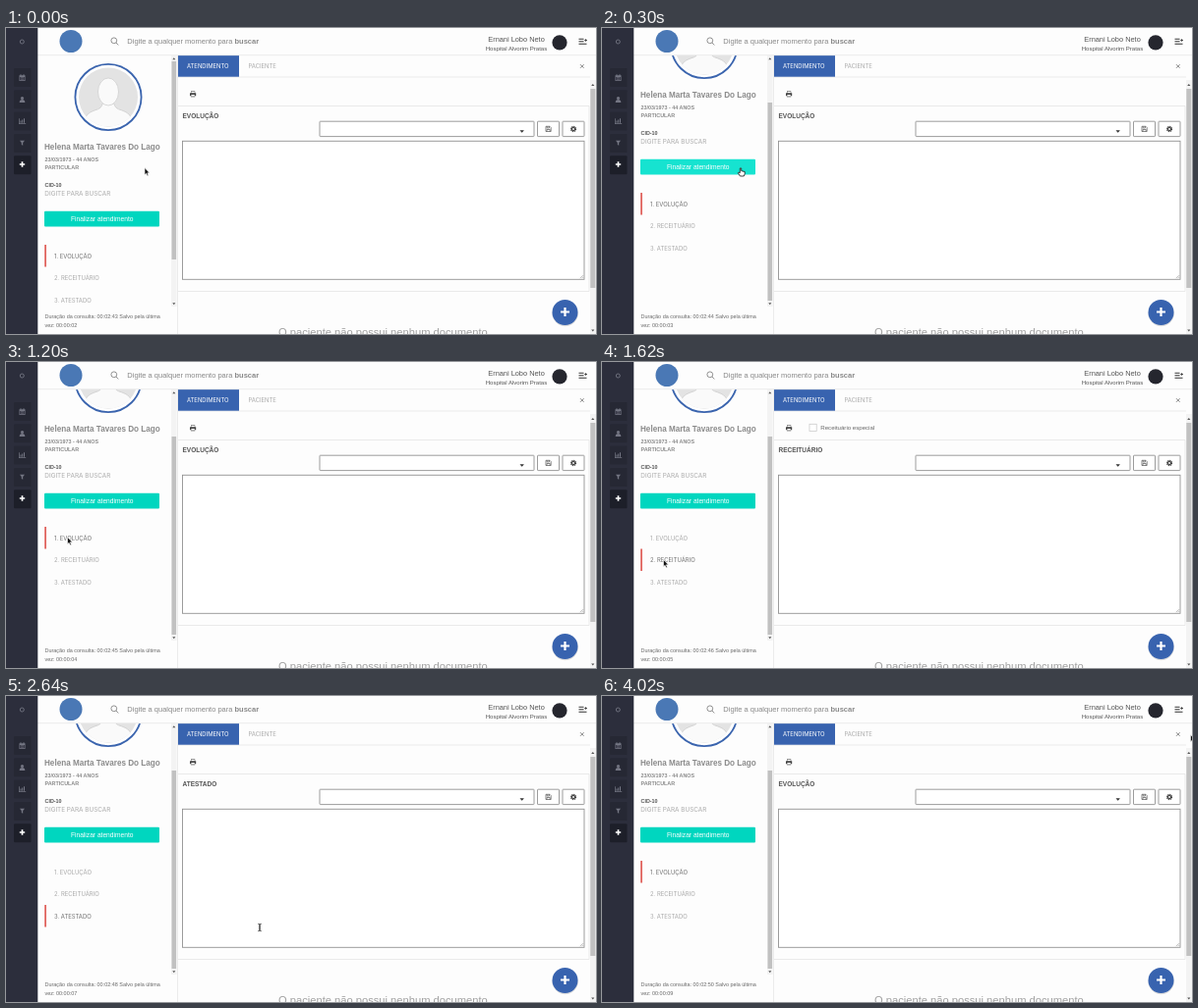
Animation, 600 px wide and 312 px high, one loop 4.08 s. Source, as an HTML page:

```html
<!DOCTYPE html>
<html lang="pt-BR">
<head>
<meta charset="utf-8">
<title>Atendimento</title>
<style>
  html, body { margin: 0; width: 100%; height: 100%; overflow: hidden; background: #fdfdfd; }
  svg { display: block; width: 600px; height: 312px; font-family: "Liberation Sans", Arial, sans-serif; }
  .wide { font-family: Inter, sans-serif; }
  .bold { font-weight: bold; }
  .mid { text-anchor: middle; }
  .line { fill: none; stroke: #e6e6e6; stroke-width: .8; }
  .box { fill: #fff; stroke: #929292; stroke-width: .9; }
  .cursor { stroke-linejoin: round; }
</style>
</head>
<body>
<svg viewBox="0 0 600 312">
  <defs>
    <clipPath id="view"><rect x="33" y="28" width="135" height="256"/></clipPath>
    <clipPath id="face"><circle cx="104" cy="70.5" r="30"/></clipPath>
  </defs>
  <rect width="600" height="312" fill="#fdfdfd"/>

  <!-- patient panel -->
  <g clip-path="url(#view)"><g id="panel">
    <circle cx="104" cy="70.5" r="33.6" fill="#fff" stroke="#3a64ae" stroke-width="1.8"/>
    <circle cx="104" cy="70.5" r="30" fill="#e3e3e3"/>
    <g clip-path="url(#face)" fill="#fafafa" stroke="#cfcfcf" stroke-width=".8">
      <path d="M80 101V94Q81 87 90 84Q98 82 98 77H110Q110 82 118 84Q127 87 128 94V101Z"/>
      <ellipse cx="104" cy="65" rx="10.5" ry="14"/>
    </g>
    <text class="bold" x="39" y="124" font-size="8.15" fill="#8b8b8b">Helena Marta Tavares Do Lago</text>
    <g class="bold" font-size="5.4" fill="#8a8a8a">
      <text x="39.5" y="136">23/03/1973 - 44 ANOS</text>
      <text x="39.5" y="144.3">PARTICULAR</text>
      <text x="39.5" y="162.3" fill="#555">CID-10</text>
    </g>
    <text class="wide" x="39.3" y="171.4" font-size="6.4" fill="#ababab">DIGITE PARA BUSCAR</text>
    <rect id="finish" x="39" y="186.7" width="117" height="15.8" rx="1"/>
    <text class="mid" x="97.7" y="197" font-size="6.65" fill="#fff">Finalizar atendimento</text>
    <g id="items" class="wide" font-size="5.9"></g>
  </g></g>
  <g font-size="5.46" fill="#666">
    <text id="length" x="39.5" y="296"></text>
    <text id="saved" x="39.5" y="305"></text>
  </g>
  <rect x="168" y="28" width="5.5" height="256" fill="#f3f3f3"/>
  <rect id="thumb" x="168.5" width="4.6" height="202" fill="#c1c1c1"/>
  <path d="M169.3 32.2l1.5-2 1.5 2zM169.3 280.2l1.5 2 1.5-2z" fill="#555"/>

  <!-- main area -->
  <path class="line" d="M174.5 28V312M175 50H594M175 79.5H593V268.5H175"/>
  <rect x="175" y="28" width="62" height="21.7" fill="#3863af"/>
  <g class="wide" font-size="5.9">
    <text x="184" y="41.2" fill="#fff">ATENDIMENTO</text>
    <text x="246.5" y="41.2" fill="#aaa">PACIENTE</text>
  </g>
  <path d="M584 37.2l3.6 3.6M587.6 37.2l-3.6 3.6" stroke="#777" stroke-width=".9"/>
  <g fill="#444">
    <path d="M188 64.3h4.2v2h-4.2zM187 66.2h6.2v3h-6.2z"/>
    <path d="M188.4 64.8h3.4v1.4h-3.4zM188.4 68h3.4v1.9h-3.4z" fill="#fff"/>
    <path d="M188 69.6h4.2v.7h-4.2z"/>
  </g>
  <g id="special">
    <rect x="211" y="63.3" width="7.2" height="7.2" fill="#fff" stroke="#ccc" stroke-width=".8"/>
    <text x="222.3" y="69.2" font-size="6.1" fill="#666">Receituário especial</text>
  </g>
  <text id="heading" class="bold" x="179.5" y="92" font-size="6.5" fill="#555"></text>
  <rect class="box" x="319" y="95.2" width="218" height="15.4" rx=".6"/>
  <rect class="box" x="540.5" y="95.2" width="22" height="15.4" rx=".6"/>
  <rect class="box" x="566" y="95.2" width="22" height="15.4" rx=".6"/>
  <path d="M522.5 104.2h4.4l-2.2 2.5z" fill="#333"/>
  <path d="M549 100.3h4l1.2 1.2v4h-5.2zM550.2 100.3v1.7h2.2v-1.7M550 105.5v-2h3.2v2" fill="none" stroke="#555" stroke-width=".7"/>
  <circle cx="577" cy="103" r="2.6" fill="none" stroke="#444" stroke-width="1.1" stroke-dasharray="1.2 .84"/>
  <circle cx="577" cy="103" r="1.6" fill="none" stroke="#444" stroke-width="1.3"/>
  <rect class="box" x="179.5" y="115.3" width="408.5" height="141"/>
  <path d="M584 255.2l3-3M586 255.2l1-1" stroke="#888" stroke-width=".6"/>
  <text x="277" y="314" font-size="11.17" fill="#a0a0a0">O paciente não possui nenhum documento</text>
  <rect x="594" y="53" width="6" height="259" fill="#f3f3f3"/>
  <rect x="594.3" y="62" width="5" height="203" fill="#c1c1c1"/>
  <path d="M595.2 59l1.6-2 1.6 2zM595.2 307.5l1.6 2 1.6-2z" fill="#555"/>
  <circle cx="568.7" cy="291" r="13.2" fill="#000" opacity=".12"/>
  <circle cx="568.5" cy="290" r="13" fill="#3863af"/>
  <path d="M564 289.5h9M568.5 285v9" stroke="#fff" stroke-width="2.2"/>

  <!-- header -->
  <rect x="32" width="568" height="27.5" fill="#fdfdfd"/>
  <path class="line" d="M32 27.7H600"/>
  <circle cx="66" cy="13.5" r="11.5" fill="#4a78b5"/>
  <g fill="none" stroke="#777" stroke-width=".8"><circle cx="109.8" cy="12.8" r="2.9"/><path d="M112 15l2.3 2.4"/></g>
  <text x="123.3" y="16.3" font-size="7.5" fill="#888">Digite a qualquer momento para <tspan class="bold">buscar</tspan></text>
  <g class="mid" fill="#555">
    <text x="519" y="14.3" font-size="7.4">Ernani Lobo Neto</text>
    <text x="519" y="22.8" font-size="6.06">Hospital Alvorim Pratas</text>
  </g>
  <circle cx="563" cy="14.8" r="7.6" fill="#25262e"/>
  <path d="M582.5 11.3h5M582.5 13.8h5M582.5 16.3h8" stroke="#333" stroke-width="1.1"/>
  <path d="M588.2 12.5h2.8M589.6 11.1v2.8" stroke="#333" stroke-width=".8"/>

  <!-- navigation rail -->
  <rect width="32.3" height="312" fill="#2c2e3c"/>
  <g id="rail"></g>
  <circle cx="16.3" cy="14" r="2" fill="none" stroke="#747683" stroke-width=".9"/>
  <g fill="#747683">
    <path d="M13.5 48.3h6v5.6h-6zM14.5 47.3h1v1.5h-1zM17.5 47.3h1v1.5h-1z"/>
    <path d="M14.2 50h4.6v3.2h-4.6z" fill="#2c2e3c"/>
    <path d="M15 50.7h3M15 52.2h3" stroke="#747683" stroke-width=".7"/>
    <circle cx="16.5" cy="71.5" r="1.6"/><path d="M13.7 76q0-3 2.8-3t2.8 3z"/>
    <path d="M13 92.3h.7v5h6.5v.7H13zM14.5 94.6h1v2.2h-1zM16.2 93.4h1v3.4h-1zM18 92.3h1v4.5h-1z"/>
    <path d="M14 114.8h5l-1.8 2.3v2.6l-1.4-.8v-1.8z"/>
  </g>
  <path d="M13.8 139h5.4M16.5 136.3v5.4" stroke="#fff" stroke-width="1.7"/>

  <!-- pointers, each with its hot spot at 0,0 -->
  <g id="pointer">
    <path class="cursor" d="M0 0V7.2L1.6 5.8 2.7 8.3 3.9 7.7 2.8 5.3H5z" fill="#111" stroke="#fff" stroke-width=".6"/>
    <path class="cursor" d="M-.7 .5Q0-.5.7.5V3.2L4.2 4V6.3L3.3 8.5H-.6L-2.7 5.2Q-2.5 4-.7 5.2Z" fill="#fff" stroke="#111" stroke-width=".8"/>
    <path class="cursor" d="M-1.7-3.7Q0-3.7 0-3V3Q0 3.7-1.7 3.7M1.7-3.7Q0-3.7 0-3V3Q0 3.7 1.7 3.7" fill="none" stroke="#222" stroke-width=".8"/>
  </g>
</svg>
<script>
const LOOP = 4080, STEP = 60, SCROLL = 53;
const labels = ["EVOLUÇÃO", "RECEITUÁRIO", "ATESTADO"];
const clicks = [[-1000, 0], [1380, 1], [1980, 2], [3360, 1], [3600, 0]]; // time, section
const path = [ // time, x, y
  [0, 141, 142.5], [300, 141, 142.5], [720, 62.5, 178.5], [1200, 62.5, 178.5],
  [1380, 62.5, 201.5], [1620, 62.5, 201.5], [1920, 62.5, 224], [2220, 62.5, 224],
  [2580, 258, 236], [2880, 258, 236], [3300, 81, 196.5], [3420, 81, 196.5],
  [3540, 78, 179], [3660, 78, 179], [4020, 598.5, 39.5], [4080, 598.5, 39.5]
];
const $ = id => document.getElementById(id);
const clamp = v => Math.max(0, Math.min(1, v));
const ease = v => v * v * (3 - 2 * v);
const pad = n => String(n).padStart(2, "0");

$("rail").innerHTML = [0, 1, 2, 3, 4].map(i =>
  `<rect x="8" y="${41 + i * 22.3}" width="17.5" height="19" rx="1" fill="${i < 4 ? "#262834" : "#1d1f29"}"/>`).join("");
$("items").innerHTML = labels.map((label, i) =>
  `<rect x="39.2" y="${221 + i * 22.5}" height="22.5" fill="#e0645f"/>
   <text x="49" y="${234.6 + i * 22.5}">${i + 1}. ${label}</text>`).join("");
const bars = $("items").querySelectorAll("rect");
const names = $("items").querySelectorAll("text");

function pointerAt(t) {
  const i = path.findIndex((p, k) => k && t <= p[0]);
  const [t0, x0, y0] = path[i - 1], [t1, x1, y1] = path[i];
  const k = ease((t - t0) / (t1 - t0));
  return [x0 + (x1 - x0) * k, y0 + (y1 - y0) * k];
}

function draw(t) {
  const scroll = ease(clamp((t - 60) / 180));
  $("panel").setAttribute("transform", `translate(0 ${-SCROLL * scroll})`);
  $("thumb").setAttribute("y", 34 + 42 * scroll);

  const last = clicks.filter(c => c[0] <= t).length - 1;
  const [since, active] = clicks[last];
  const previous = last ? clicks[last - 1][1] : -1;
  labels.forEach((_, i) => {
    const leaving = i === previous ? 1 - clamp((t - since) / 120) : 0;
    bars[i].setAttribute("width", 1.8 * (i === active ? 1 : leaving));
    names[i].setAttribute("fill", i === active ? "#707070" : "#a8a8a8");
  });
  $("heading").textContent = labels[active];
  $("special").setAttribute("visibility", active === 1 ? "visible" : "hidden");

  const seconds = Math.floor((t + 360) / 600);
  $("length").textContent = `Duração da consulta: 00:02:${pad(43 + seconds)} Salvo pela última`;
  $("saved").textContent = `vez: 00:00:${pad(2 + seconds)}`;

  const [x, y] = pointerAt(t);
  const top = 186.7 - SCROLL * scroll;
  const onButton = x > 39 && x < 156 && y > top && y < top + 15.8;
  const onText = x > 180 && x < 588 && y > 115 && y < 256;
  const shape = onButton ? 1 : onText ? 2 : 0;
  $("finish").setAttribute("fill", onButton ? "#16e3d0" : "#00d6bf");
  $("pointer").setAttribute("transform", `translate(${x} ${y})`);
  [...$("pointer").children].forEach((p, i) => p.setAttribute("visibility", i === shape ? "visible" : "hidden"));
}

const start = performance.now();
function tick() {
  const t = (performance.now() - start) % LOOP;
  draw(Math.floor(t / STEP) * STEP);
  requestAnimationFrame(tick);
}
tick();
</script>
</body>
</html>
```
